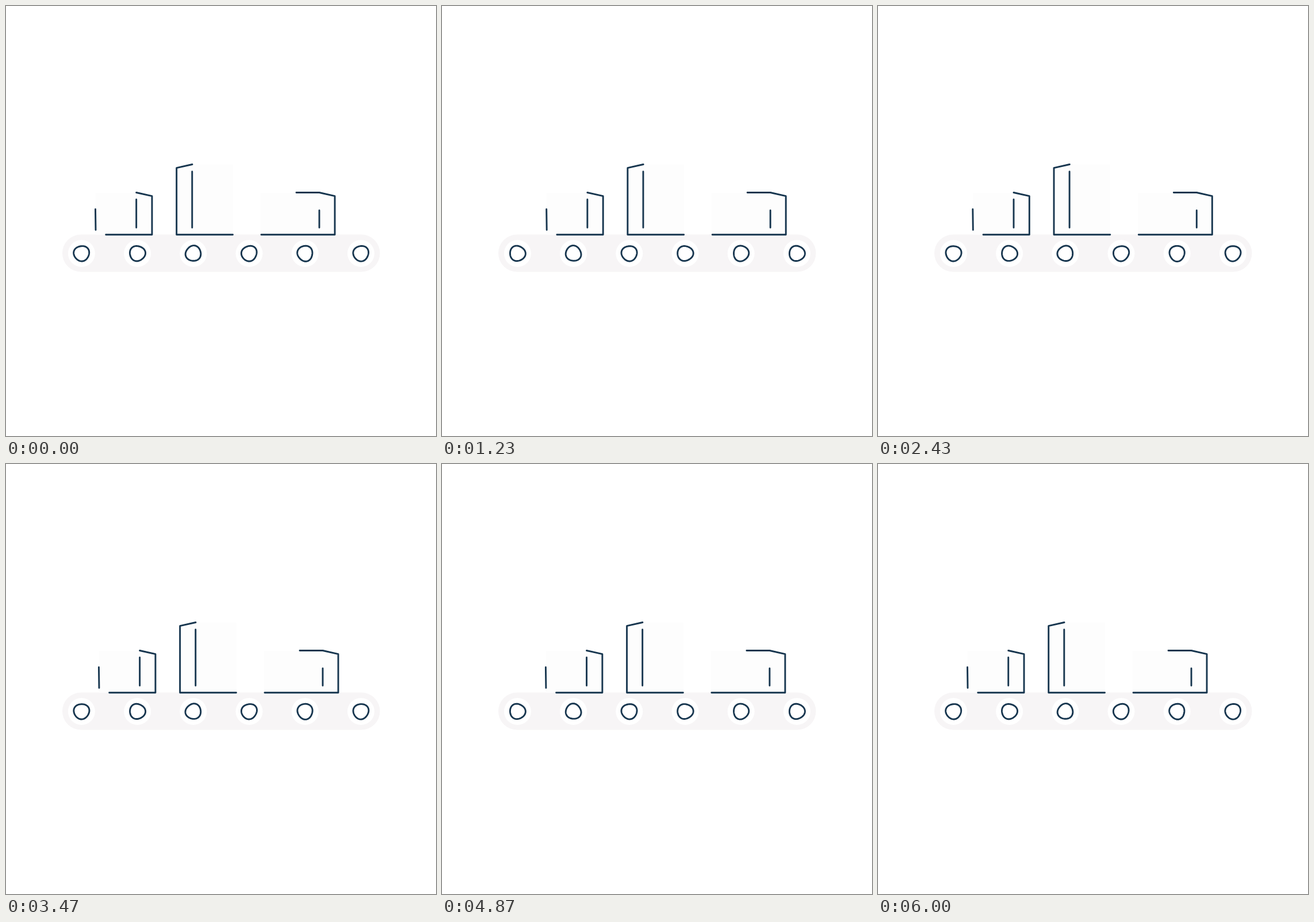
Write an HTML page that moves like this. It is 748 px wide and 748 px high and loops after 6.03 s.

```html
<!DOCTYPE html>
<html lang="en">
<head>
<meta charset="utf-8">
<title>Conveyor belt</title>
<style>
  html, body { margin: 0; width: 100%; height: 100%; overflow: hidden; background: #fff; }
  svg { display: block; width: 100%; height: 100%; }
  .ink { fill: none; stroke: #17364f; stroke-width: 2.9; stroke-linecap: round; stroke-linejoin: round; }
  .face { fill: #fdfdfd; }
</style>
</head>
<body>
<svg viewBox="0 0 748 748">
  <rect x="98" y="397.5" width="552.5" height="65" rx="32.5" fill="#f7f5f6"/>
  <g id="rollers"></g>
  <g id="boxes">
    <path class="face" d="M156 325H226.5L254 330.5V398H156Z M296.5 282L324 276H395V398H296.5Z M443 325H545L572 330.5V398H443Z"/>
    <path class="ink" d="M155.5 353.5L156 389.5 M226.7 336.5V385.5 M226.7 324.5L254 330.7V397.8H173.7
      M324 275.5L296.7 281.7V397.8H394.5 M323.8 288V385.5
      M505 324.5H545L572 330.7V397.8H444 M545 355.5V385.5"/>
  </g>
</svg>
<script>
const LOOP = 6030, TRAVEL = 28.5, TURN = 45;
const RAD = Math.PI / 180;
const rollers = document.getElementById('rollers');
const boxes = document.getElementById('boxes');

// Slightly uneven ring; lobe and axis are angles in degrees.
function ring(lobe, axis, stretch) {
  const points = [];
  for (let a = 0; a < 360; a += 5) {
    const r = 13.3 + 0.5 * Math.cos(3 * (a - lobe) * RAD) + stretch * Math.cos(2 * (a - axis) * RAD);
    points.push((r * Math.cos(a * RAD)).toFixed(2) + ' ' + (r * Math.sin(a * RAD)).toFixed(2));
  }
  return 'M' + points.join('L') + 'Z';
}

const shapes = [[-40, -20, 0.2], [-10, 0, 0.25], [-80, -45, 0.2], [-45, -45, 0.45], [73, 73, 0.25], [-40, -45, 0.2]];
rollers.innerHTML = shapes.map((shape, i) =>
  `<g transform="translate(${131.4 + 97.2 * i} 430.4)"><circle r="23.5" fill="#fff"/><path class="ink" d="${ring(...shape)}"/></g>`
).join('');
const rings = rollers.querySelectorAll('path');

function draw(now) {
  const sway = (1 - Math.cos(4 * Math.PI * (now % LOOP) / LOOP)) / 2;
  boxes.setAttribute('transform', `translate(${TRAVEL * sway} 0)`);
  rings.forEach(r => r.setAttribute('transform', `rotate(${TURN * sway})`));
  requestAnimationFrame(draw);
}
draw(0);
</script>
</body>
</html>
```
